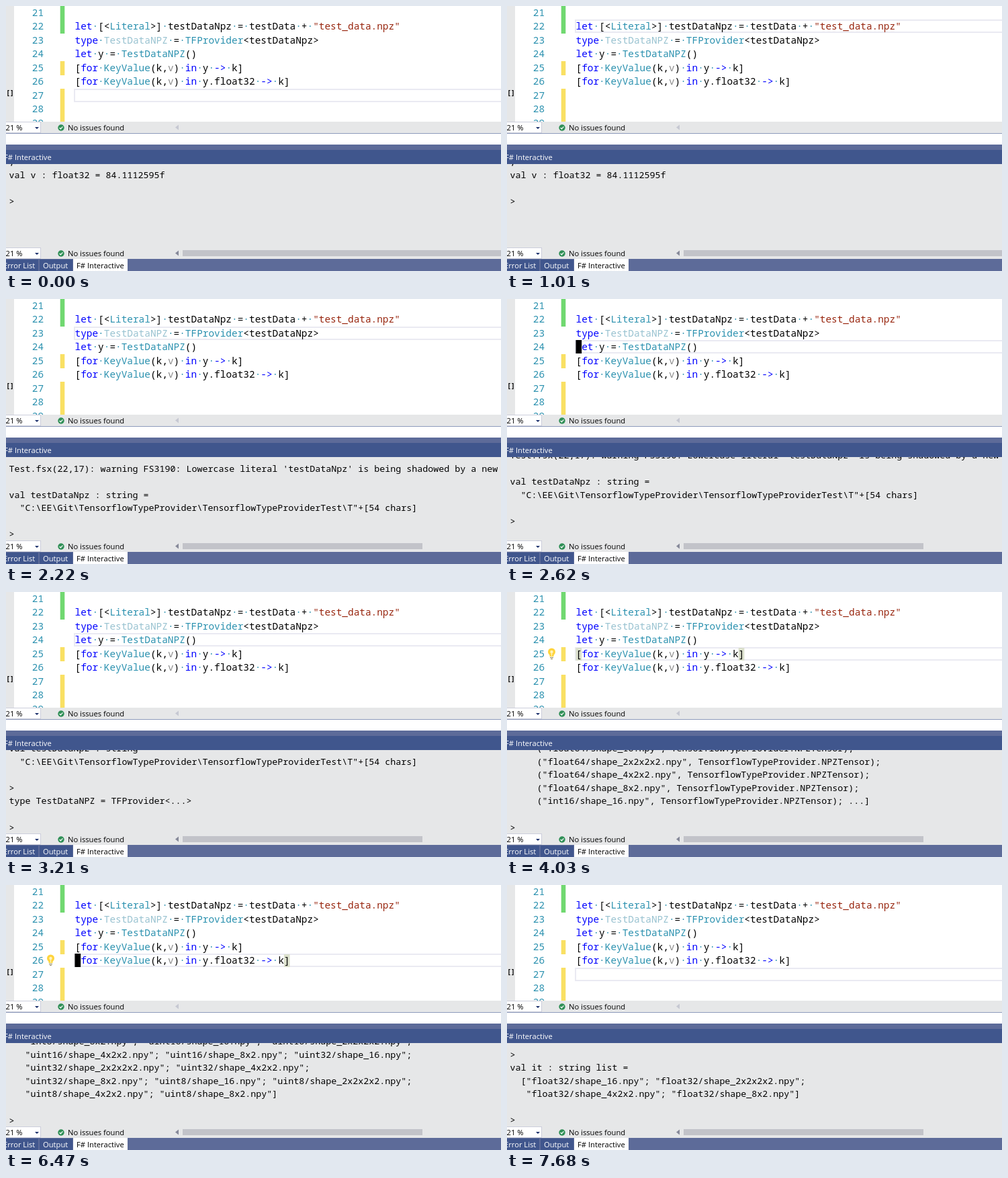
An HTML page with a canvas that plays this animation: 737 px wide and 394 px high, repeating every 8 s.

```html
<!DOCTYPE html>
<html lang="en">
<head>
<meta charset="utf-8">
<title>Interactive session</title>
<style>
  html, body { margin: 0; width: 100%; height: 100%; overflow: hidden; background: #fff; }
  canvas { display: block; }
</style>
</head>
<body>
<canvas id="stage" width="737" height="394"></canvas>
<script>
const ctx = document.getElementById('stage').getContext('2d');
const W = 737, LOOP = 8000;
const CODE_FONT = '14.42px "Noto Sans Mono", monospace';
const OUT_FONT = '13.33px "Noto Sans Mono", monospace';
const UI_FONT = '11.2px "Open Sans", sans-serif';
const CODE_X = 102.5, CODE_ADVANCE = 8.65, OUT_X = 4.5, OUT_PITCH = 19.55;
const GREY = '#e6e7e8', BAND = '#5d6b99', HEADER = '#40568d', TEAL = '#2b91af';
const INK = '#000', YELLOW = '#f9e063', BULB = '#ffd43c', BULB_CORE = '#fff3bd';

const code = {
  22: 'let [<Literal>] testDataNpz = testData + "test_data.npz"',
  23: 'type TestDataNPZ = TFProvider<testDataNpz>',
  24: 'let y = TestDataNPZ()',
  25: '[for KeyValue(k,v) in y -> k]',
  26: '[for KeyValue(k,v) in y.float32 -> k]'
};

// Time each line becomes current, and the column of its caret.
const moves = [
  [0, 27, 0], [380, 22, 55], [1600, 23, 0], [2620, 24, 0],
  [3430, 25, 0], [4430, 26, 0], [7080, 27, 0]
];
const caretOn = [
  [380, 1010], [1600, 2220], [2620, 3210], [3430, 4030],
  [4430, 5050], [5450, 6060], [6470, 7080], [7080, 7680]
];
const bulbs = [[25, 3840, 4430], [26, 5050, 7080]];
const braces = [[25, 3610, 4650], [26, 4650, 7280]];

const idle = [',', 'val v : float32 = 84.1112595f', '', '>'];
const path = '  "C:\\EE\\Git\\TensorflowTypeProvider\\TensorflowTypeProviderTest\\T"+[54 chars]';
const literal = [
  "Test.fsx(22,17): warning FS3190: Lowercase literal 'testDataNpz' is being shadowed by a new",
  '', 'val testDataNpz : string =', path, '', '>'
];
const tensor = (name, end = '') =>
  `     ("${name}.npy", TensorflowTypeProvider.NPZTensor);${end}`;
const names = (list, open = '   ', close = ';') =>
  open + list.split(' ').map(n => {
    const [type, shape] = n.split('/');
    return `"${type}/shape_${shape}.npy"`;
  }).join('; ') + close;

// Each output starts one row above the visible area.
const outputs = [
  [0, 256, idle],
  [1600, 256, [...idle, '', '>']],
  [1800, 256.6, ['', ...literal]],
  [2620, 256.6, literal],
  [2820, 256.8, ['val testDataNpz : string =', path, '', '>',
    'type TestDataNPZ = TFProvider<...>', '', '>']],
  [3430, 256.8, [
    tensor('float64/shape_16'), tensor('float64/shape_2x2x2x2'),
    tensor('float64/shape_4x2x2'), tensor('float64/shape_8x2'),
    tensor('int16/shape_16', ' ...]'), '', '>']],
  [4430, 256.8, [
    names('int8/8x2 uint16/16 uint16/2x2x2x2'),
    names('uint16/4x2x2 uint16/8x2 uint32/16'),
    names('uint32/2x2x2x2 uint32/4x2x2'),
    names('uint32/8x2 uint8/16 uint8/2x2x2x2'),
    names('uint8/4x2x2 uint8/8x2', '   ', ']'), '', '>']],
  [7080, 256.6, ['', '>', 'val it : string list =',
    names('float32/16 float32/2x2x2x2', '  ['),
    names('float32/4x2x2 float32/8x2', '   ', ']'), '', '>']]
];

const latest = (list, t) => list.filter(item => item[0] <= t).pop();
const rowTop = line => Math.round(20.3 + (line - 22) * 20.5);
const colX = col => CODE_X + col * CODE_ADVANCE;

function rect(color, x, y, w, h) {
  ctx.fillStyle = color;
  ctx.fillRect(x, y, w, h);
}

function text(str, x, y, color, font) {
  ctx.font = font;
  ctx.fillStyle = color;
  ctx.fillText(str, x, y);
}

function shape(color, points) {
  ctx.fillStyle = color;
  ctx.beginPath();
  points.forEach(([x, y]) => ctx.lineTo(x, y));
  ctx.fill();
}

function disc(color, x, y, r) {
  ctx.fillStyle = color;
  ctx.beginPath();
  ctx.arc(x, y, r, 0, Math.PI * 2);
  ctx.fill();
}

function clipped(x, y, w, h, draw) {
  ctx.save();
  ctx.beginPath();
  ctx.rect(x, y, w, h);
  ctx.clip();
  draw();
  ctx.restore();
}

function tokenColor(token, line) {
  if (token === ' ') return TEAL;
  if (token[0] === '"') return '#98260f';
  if (/^(let|type|for|in|->)$/.test(token)) return '#0000ff';
  if (token === 'TestDataNPZ' && line === 23) return '#98c2d0';
  if (/^(Literal|TFProvider|KeyValue|TestDataNPZ)$/.test(token)) return TEAL;
  return token === 'v' ? '#8c8c8c' : INK;
}

function drawCode(line) {
  const y = rowTop(line) + 15;
  for (const match of code[line].matchAll(/"[^"]*"|->|\w+|./g)) {
    const token = match[0];
    text(token === ' ' ? '·' : token, colX(match.index), y, tokenColor(token, line), CODE_FONT);
  }
}

function drawBulb(line) {
  const y = rowTop(line);
  disc(BULB, 66.5, y + 7, 5.5);
  rect(BULB, 63.5, y + 10, 6, 4);
  disc(BULB_CORE, 66.5, y + 7, 2.2);
  rect(BULB_CORE, 65.8, y + 8, 1.4, 5);
  rect('#8c8259', 64, y + 15, 5, 1);
  rect('#8c8259', 65, y + 17, 3, 1);
}

function drawChangeBar(color, y, h) {
  rect(color, 80.7, y, 6.6, h);
}

function drawEditor(t) {
  const [, current, caretCol] = latest(moves, t);
  rect(GREY, 0, 0, 12, 172);
  text('[]', 0, 133, INK, 'bold 10px "Noto Sans Mono", monospace');
  drawChangeBar('#70d870', 0, 41);
  drawChangeBar(YELLOW, 82, 21);
  drawChangeBar(YELLOW, 123, 49);

  ctx.strokeStyle = '#eaeaf2';
  ctx.lineWidth = 2;
  ctx.strokeRect(102, rowTop(current) + 1, 800, 18);

  for (const [line, from, to] of braces) {
    if (t < from || t >= to) continue;
    for (const col of [0, code[line].length - 1]) {
      rect('#dbe0cc', colX(col), rowTop(line) + 1, CODE_ADVANCE, 19);
    }
  }
  for (let line = 21; line <= 29; line++) {
    text(line, 38.8, rowTop(line) + 15, TEAL, CODE_FONT);
    if (code[line]) drawCode(line);
  }
  for (const [line, from, to] of bulbs) {
    if (t >= from && t < to) drawBulb(line);
  }
  if (caretOn.some(([from, to]) => t >= from && t < to)) {
    rect(INK, colX(caretCol), rowTop(current), CODE_ADVANCE, 20);
  }
}

function drawStatus(y, arrowColor) {
  rect(GREY, 0, y, W, 17);
  rect('#cccedb', 0, y, 52, 17);
  rect('#fff', 0, y + 1, 51, 15);
  text('21 %', -0.5, y + 13, INK, UI_FONT);
  shape('#1b2f6b', [[43, y + 8], [49, y + 8], [46, y + 11]]);
  disc('#2f8f56', 82, y + 9, 4.7);
  ctx.strokeStyle = '#fff';
  ctx.lineWidth = 1.3;
  ctx.beginPath();
  ctx.moveTo(79.7, y + 9);
  ctx.lineTo(81.4, y + 10.8);
  ctx.lineTo(84.4, y + 7.3);
  ctx.stroke();
  text('No issues found', 92, y + 13, INK, UI_FONT);
  shape(arrowColor, [[252, y + 8.5], [257, y + 4.5], [257, y + 12.5]]);
}

function drawOutput(t) {
  const [, firstBaseline, lines] = latest(outputs, t);
  lines.forEach((str, i) => {
    const y = Math.round(firstBaseline + (i - 1) * OUT_PITCH);
    text(str, OUT_X, y, INK, OUT_FONT);
  });
}

function drawTabs() {
  rect(BAND, 0, 376, W, 18);
  rect(HEADER, 0, 377, 48, 17);
  rect(HEADER, 50, 377, 49, 17);
  rect('#fff', 100, 376, 81, 18);
  text('Error List', -4, 390, '#fff', UI_FONT);
  text('Output', 55, 390, '#fff', UI_FONT);
  text('F# Interactive', 105, 390, INK, UI_FONT);
}

function draw(t) {
  rect('#fff', 0, 0, W, 394);
  clipped(0, 0, W, 172, () => drawEditor(t));
  drawStatus(172, '#c6c8d2');
  rect('#8e9bbc', 0, 189, W, 1);

  rect(BAND, 0, 206, W, 8);
  rect(HEADER, 0, 214, W, 21);
  text('F# Interactive', -3, 229, '#fff', UI_FONT);
  rect(GREY, 0, 235, W, 125);
  clipped(0, 235, W, 125, () => drawOutput(t));
  drawStatus(359, '#868999');
  rect('#c2c3c9', 263, 363, (t < 1800 ? W : 620) - 263, 9);
  drawTabs();
}

function tick() {
  draw(performance.now() % LOOP);
  requestAnimationFrame(tick);
}
tick();
</script>
</body>
</html>
```
